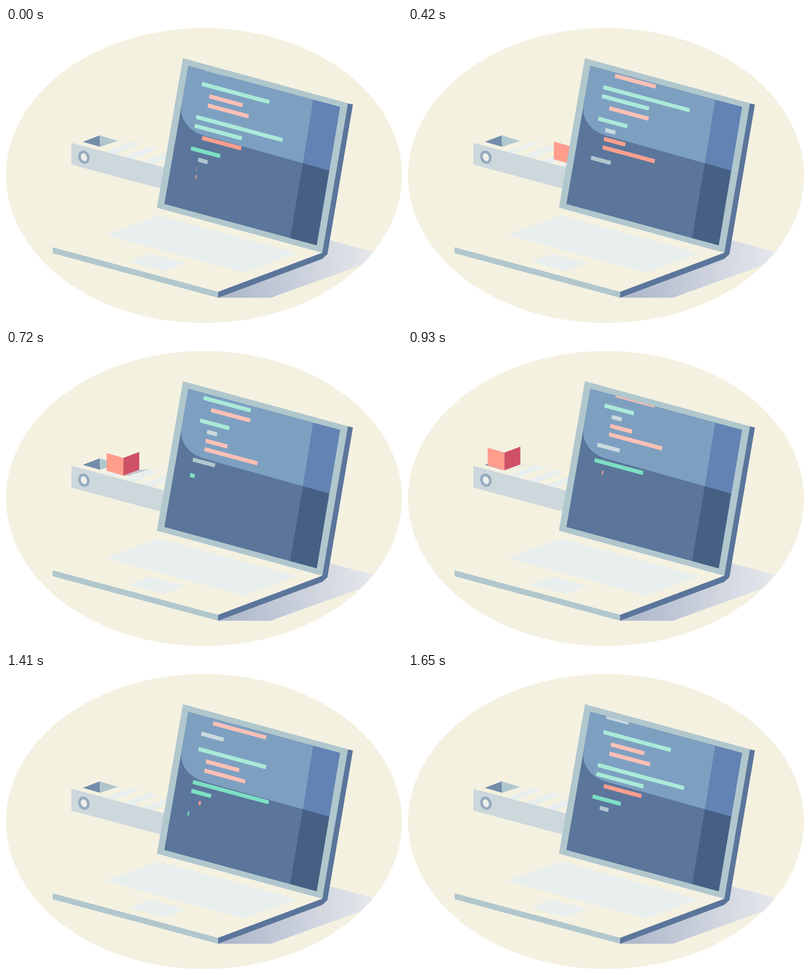
An HTML page for the animation above (1680 ms loop, 799x596 px).

```html
<!DOCTYPE html>
<html lang="en">
<head>
<meta charset="utf-8">
<title>Laptop and conveyor</title>
<style>
  html, body { margin: 0; width: 100%; height: 100%; overflow: hidden; background: #fff; }
  svg { display: block; width: 100%; height: 100%; }
</style>
</head>
<body>
<svg viewBox="0 0 799 596">
  <defs>
    <clipPath id="oval"><ellipse cx="399.5" cy="298" rx="399.5" ry="298"/></clipPath>
    <clipPath id="display"><path d="M368 76.5 674 159.5 627 439 319.5 355.5Z"/></clipPath>
    <clipPath id="beltTop"><path d="M200 250 253 229 340 252 340 290Z"/></clipPath>
    <clipPath id="aboveHole"><path d="M150 150H270V214L222 228 190 240 156 230H150Z"/></clipPath>
    <linearGradient id="fade" gradientUnits="userSpaceOnUse" x1="455" y1="0" x2="740" y2="0">
      <stop offset="0" stop-color="#afb9cc"/>
      <stop offset="1" stop-color="#e6e8ec"/>
    </linearGradient>
    <path id="glare" d="M368 76.5 674 159.5 652 288 400 217.5C370 209 352 186 353.5 160Z"/>
  </defs>

  <g clip-path="url(#oval)">
    <rect width="799" height="596" fill="#f4f1e1"/>
    <path fill="url(#fade)" d="M654 429 770 460 545 541Q538 545 530 545H428L638 460Z"/>
  </g>

  <!-- conveyor -->
  <g clip-path="url(#beltTop)"><g id="stripes" fill="#e8efee"></g></g>
  <path fill="#cdd8dc" d="M132 232 330 284.500 330 329 132 276Z"/>
  <ellipse cx="157.200" cy="261" rx="8.600" ry="11" transform="rotate(-20 157.200 261)"
    fill="#eceeea" stroke="#97abbf" stroke-width="5.500"/>
  <path fill="#728dab" d="M155 230 189 217 190 240Z"/>
  <path fill="#b0c7cd" d="M189 217 226 228 190 240Z"/>

  <g id="box">
    <path id="boxShade" fill="#c4c7d1" d="M190 240 222 228 241 227.500 201 240Z"/>
    <g clip-path="url(#aboveHole)">
      <g id="boxBody">
        <path fill="#ff9d8d" d="M156 194 190 204V240L156 230Z"/>
        <path fill="#cf5166" d="M190 204 222 192V228L190 240Z"/>
      </g>
    </g>
  </g>

  <!-- laptop -->
  <path fill="#e8efee" d="M200 418 308 379 587 455 480 494ZM247 472 292 456 362 475 320 491Z"/>
  <path fill="#b0c7cd" d="M94 443 428 533V545L94 455Z"/>
  <path fill="#5b759b" d="M689 152 700 154.500 648.500 457 638 466.500 428 545V533L638 454Z"/>
  <path fill="#b0c7cd" d="M357 61 690 152 638 454 304.500 363Z"/>
  <g clip-path="url(#display)">
    <rect x="310" y="70" width="370" height="375" fill="#5b759b"/>
    <use href="#glare" fill="#396fa0"/>
    <g id="bars"></g>
    <use href="#glare" fill="#fff" opacity=".34"/>
    <path fill="#6283b4" d="M620.500 140 690 150 652 288 599 273Z"/>
    <path fill="#466084" d="M599 273 652 288 627 440 573 426Z"/>
  </g>
</svg>

<script>
const LOOP = 1680, STEP = 30, PITCH = 38;
const TEAL = '#7ddfc3', CORAL = '#ff9f8e', GREY = '#b0c6cd';

// x, y (where the bar is when the loop restarts), length, colour, birth, growth time
const bars = [
  [396, 109, 136, TEAL, 650, 430],
  [411, 134, 67, CORAL, 893, 320],
  [408, 152.5, 82, CORAL, 989, 320],
  [384.5, 175.5, 174, TEAL, 1088, 412],
  [381.5, 193.5, 95, TEAL, 1267, 320],
  [396.5, 218, 79, CORAL, 1367, 320],
  [374, 239, 59, TEAL, 1367, 320],
  [388.5, 262, 20, GREY, 1410, 310],
  [385.5, 280, 44, CORAL, 1640, 500],
  [383, 297, 107, CORAL, 1640, 500],
  [359.5, 318, 45, GREY, 1788, 395]
];

const $ = id => document.getElementById(id);
const mod = (a, n) => ((a % n) + n) % n;
const ease = (t, start, duration) => {
  const p = Math.min(1, Math.max(0, (t - start) / duration));
  return p * p * (3 - 2 * p);
};
const move = (el, x, y) => el.setAttribute('transform', `translate(${x} ${y})`);

function addPath(parent, fill, d = '') {
  const path = document.createElementNS('http://www.w3.org/2000/svg', 'path');
  path.setAttribute('d', d);
  if (fill) path.setAttribute('fill', fill);
  return parent.appendChild(path);
}

for (let i = 0; i < 5; i++) {
  move(addPath($('stripes'), null, 'M200 250 253 229 271 233.5 219 255Z'), i * PITCH, i * PITCH * 0.265);
}
const barPaths = bars.map(bar => addPath($('bars'), bar[3]));

function drawBar([x, y, length, , birth, growth], i, t) {
  const now = birth + mod(t - birth, LOOP);
  const rise = (LOOP - now) / 7;
  const w = length * ease(now, birth, growth);
  barPaths[i].setAttribute('d',
    `M${x - rise * 0.176} ${y + rise}l${w} ${w * 0.269} -1.5 8 ${-w} ${-w * 0.269}Z`);
}

function draw(t) {
  bars.forEach((bar, i) => drawBar(bar, i, t));

  const travel = ease(t, 90, 925);
  const shift = (travel * 4 * PITCH) % PITCH;
  move($('stripes'), -shift, -shift * 0.265);

  const away = 195 * (1 - travel);
  move($('box'), away, away * 0.255);
  move($('boxBody'), 0, 38 * ease(t, 1150, 220));
  $('boxShade').setAttribute('opacity', Math.min(1, away / 25));
}

function tick() {
  draw(Math.floor((performance.now() % LOOP) / STEP) * STEP);
  requestAnimationFrame(tick);
}
tick();
</script>
</body>
</html>
```
